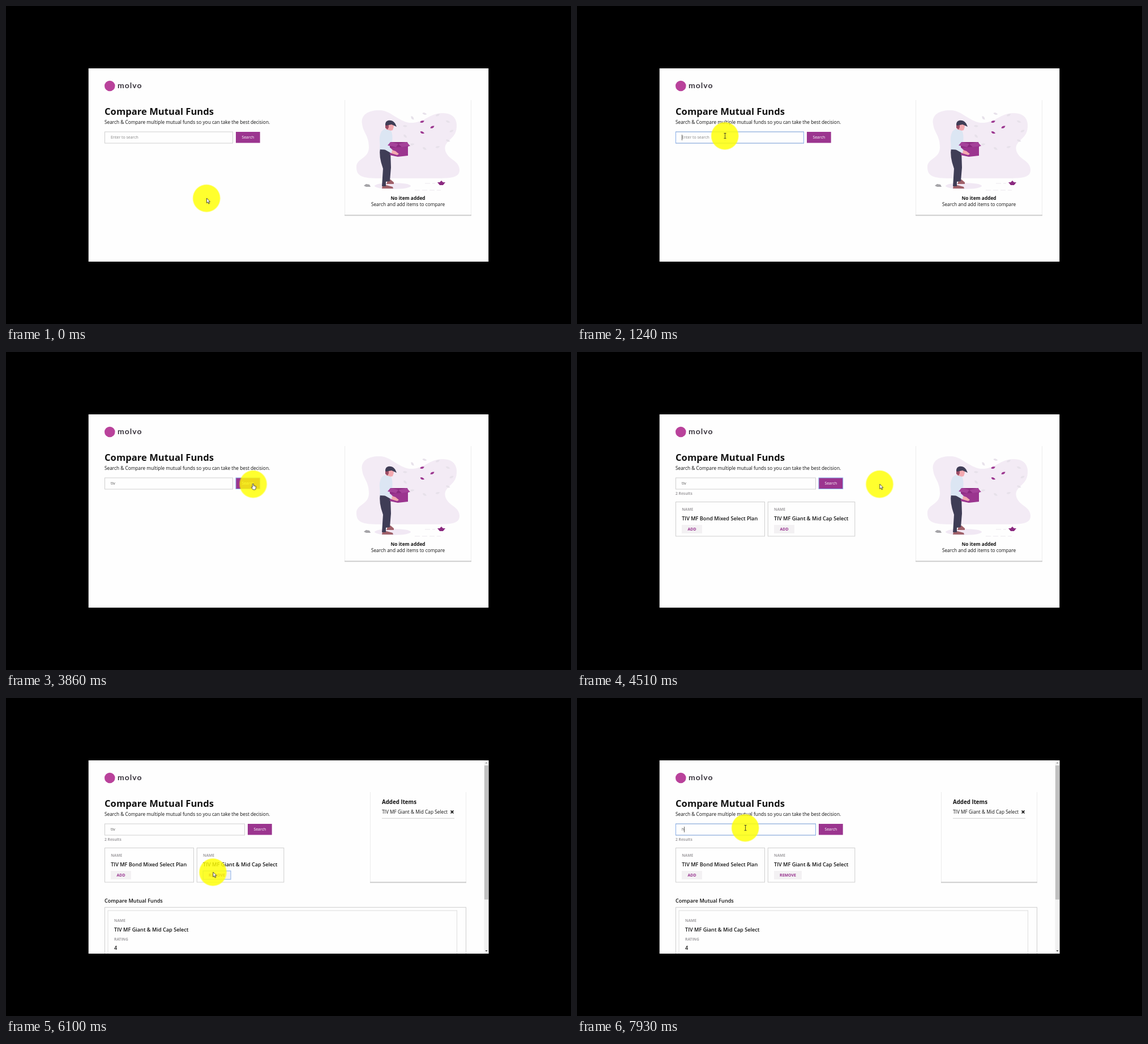
Recreate the animation shown at these times as an HTML page. Size 998 by 561 pixels, loop 8 s.

```html
<!DOCTYPE html>
<html lang="en">
<head>
<meta charset="utf-8">
<title>Fund comparison</title>
<style>
  html, body { margin: 0; width: 100%; height: 100%; overflow: hidden; background: #000; }
  svg { display: block; width: 100vw; height: 100vh; }
  text { font: 8.32px "Open Sans", sans-serif; fill: #111; }
  .h1 { font-size: 16.64px; font-weight: 700; }
  .h3 { font-size: 9.73px; font-weight: 700; }
  .title { font-size: 9.15px; font-weight: 600; }
  .bold { font-weight: 700; }
  .label { font-size: 6.66px; font-weight: 700; fill: #a2a0a3; }
  .field { font-size: 6.93px; fill: #555; }
  .hint { font-size: 6.93px; fill: #858585; }
  .action { font-size: 6.93px; font-weight: 700; fill: #97338f; text-anchor: middle; }
  .search { font-size: 6.93px; fill: #fff; text-anchor: middle; }
  .mid { text-anchor: middle; }
  .brand { font: 700 14px Lato, sans-serif; letter-spacing: 1px; fill: #39343d; }
  .box { fill: #fefefe; stroke: #cfcfcf; }
  .ring { fill: none; stroke: #86aeea; }
  .button { fill: #9b358f; }
  .soft { fill: #f3f1f3; }
  .caret { fill: #222; }
  .edge { fill: none; stroke: #ececec; }
  .under { stroke: #cdcdcd; stroke-width: 2; }
  .cursor { fill: #fff; stroke: #222; stroke-width: .8; }
</style>
</head>
<body>
<svg viewBox="0 0 998 561" preserveAspectRatio="none">
  <defs>
    <clipPath id="pageClip"><rect x="145.5" y="110" width="707" height="341"/></clipPath>
    <radialGradient id="glow">
      <stop offset=".93" stop-color="#ff0" stop-opacity=".82"/>
      <stop offset="1" stop-color="#ff0" stop-opacity=".25"/>
    </radialGradient>
    <path id="leaf" d="M-3.5 1.5Q-3-3 3.5-2.5Q2 3-3.5 1.5Z"/>
  </defs>

  <g clip-path="url(#pageClip)">
    <rect x="145.5" y="110" width="707" height="341" fill="#fefefe"/>
    <circle cx="183.3" cy="141" r="9.3" fill="#b9429b"/>
    <text class="brand" x="197" y="145">molvo</text>
    <text class="h1" x="174" y="192">Compare Mutual Funds</text>
    <text x="174" y="208">Search &amp; Compare multiple mutual funds so you can take the best decision.</text>

    <g id="bars"></g>
    <g id="results">
      <text class="label" x="174" y="252">2 Results</text>
      <g id="cards"></g>
    </g>

    <rect id="selection" x="185" y="227" width="8" height="10" fill="#a9c9f8"/>
    <text id="hint" class="hint" x="185" y="234.3">Enter to search</text>
    <g id="typing"></g>

    <g id="emptyPanel">
      <path class="edge" d="M598.5 166V369M821.5 166V369"/>
      <path class="under" d="M598 369.3H822"/>
      <path fill="#f3ebf5" d="M629 208C626 190 643 183 662 184S697 208 719 206S747 190 770 189S799 204 795 220S772 239 776 255S800 272 801 288S785 304 750 304H660C628 304 619 300 619 284S641 270 641 249S631 224 629 208Z"/>
      <ellipse cx="683" cy="317.5" rx="32" ry="5.5" fill="#f1e8f4"/>
      <path d="M740 313h18M722 325h46" stroke="#ebe8ed" stroke-dasharray="9 4"/>
      <path fill="#a5a4a8" d="M632 317l4-3 6 1 2 4h-8Z"/>
      <path fill="#8b2a80" d="M762 311h4l3-3 3 3h4l-4 5h-6Z"/>
      <g id="leaves"></g>
      <path fill="#a0616a" d="M674 308l5-2 6 5v3h-13ZM665 317l7-1 11 3 1 3h-20Z"/>
      <path fill="#3f3d56" d="M661 250L679 254L680 285L678 309L671 310V318H664L666 287Q658 265 661 250Z"/>
      <path fill="#f3a9b0" d="M671 207h13l1 6-2 6-4 1 1 5-8-1Z"/>
      <path fill="#9d4d65" d="M670 208h6v6l-2 4-4-3Z"/>
      <path fill="#3f3d56" d="M670 209C670 202 677 200 683 203Q687 205 690 213L681 209L671 211Z"/>
      <path fill="#dce6f3" d="M669 217L680 220Q685 228 680 254L660 253C662 243 658 237 661 227Q663 219 669 217Z"/>
      <path fill="#9b358f" d="M678 247h32v17l-18 2-14-3Z"/>
      <path fill="#8b2a80" d="M679 240h30l2 8-33 2Z"/>
      <path fill="#a5429a" d="M679 240l-5 6 15 3 4-6ZM708 240l6 7-15 2-6-6Z"/>
      <path fill="#dce6f3" d="M663 226C669 224 673 232 672 244L684 255L681 260L665 251Z"/>
      <path fill="#f3a9b0" d="M682 254l6 2 6 5-3 2-10-3Z"/>
      <text class="bold mid" x="710" y="341.5">No item added</text>
      <text class="mid" x="710" y="353">Search and add items to compare</text>
    </g>

    <g id="addedPanel">
      <path class="edge" d="M643.5 166V325M812.5 166V325"/>
      <path class="under" d="M643 325.3H813"/>
      <text class="h3" x="664" y="187.3">Added Items</text>
      <text x="664" y="204">TIV MF Giant &amp; Mid Cap Select</text>
      <path d="M785.6 198.7l4.8 4.8m0-4.8l-4.8 4.8" stroke="#111" stroke-width="1.7"/>
      <path d="M664 212.3H792" stroke="#cfcfcf"/>
    </g>

    <text id="compareTitle" class="title" x="174" y="360.5">Compare Mutual Funds</text>
    <rect id="compareEmpty" class="box" x="174.5" y="369.3" width="647" height="10.5"/>
    <g id="compare">
      <rect class="box" x="174.5" y="369.3" width="638" height="120"/>
      <rect class="box" x="180" y="375" width="616.5" height="110" style="stroke:#dedede"/>
      <text class="label" x="191" y="395.3">NAME</text>
      <text class="title" x="191" y="412">TIV MF Giant &amp; Mid Cap Select</text>
      <text class="label" x="191" y="427.5">RATING</text>
      <text class="title" x="191" y="444.3">4</text>
      <rect x="844.5" y="110" width="8" height="341" fill="#f1f1f1"/>
      <rect x="845" y="119" width="7" height="236.5" fill="#c1c1c1"/>
      <path d="M846.5 115.5l2-2.5 2 2.5Z" fill="#999"/>
      <path d="M846.5 445l2 2.5 2-2.5Z" fill="#444"/>
    </g>
  </g>

  <g id="pointer">
    <circle cx=".2" cy=".2" r="24.7" fill="url(#glow)"/>
    <path id="arrow" class="cursor" d="M.5 0v8.6l2-1.8 1.4 3.2 1.4-.6-1.4-3.1h2.6Z"/>
    <path id="beam" class="cursor" d="M-1.5-4.5h4M.5-4.5v9M-1.5 4.5h4"/>
    <path id="hand" class="cursor" d="M-1 5V0q1-1.4 2 0v3l4 1v3l-1 3H0L-3 6q0-1.6 2-.3Z"/>
  </g>
</svg>
<script>
const LOOP = 8000;
const FOCUS = 1240, SUBMIT = 3720, RESULTS = 4370, ADDED = 5650, LOADED = 5960;
const REFOCUS = 7000, SELECTED = 7170, RETYPE = 7930;
const timing = { duration: LOOP, iterations: Infinity };
const byId = id => document.getElementById(id);
const append = (id, markup) => byId(id).insertAdjacentHTML('beforeend', markup);

// Visible only between the two times, with hard changes.
function show(id, from, to = LOOP) {
  const frame = (time, opacity) => ({ offset: time / LOOP, opacity, easing: 'steps(1, end)' });
  const frames = [frame(from, 1), frame(LOOP, 0)];
  if (from > 0) frames.unshift(frame(0, 0));
  if (to < LOOP) frames.splice(-1, 0, frame(to, 0));
  byId(id).animate(frames, timing);
}

function addSearchBar(id, width) {
  const input = `x="174.5" y="222" width="${width}" height="20"`;
  const left = 180 + width;
  const button = `x="${left}" y="222" width="42.7" height="19.5"`;
  append('bars', `<g id="${id}">
    <rect class="box" ${input}/><rect class="button" ${button}/>
    <text class="search" x="${left + 21.3}" y="234.3">Search</text>
    <rect id="${id}Focus" class="ring" ${input}/>
    <rect id="${id}Press" class="ring" ${button}/></g>`);
}

function addButton(parent, id, x, width, label) {
  const area = `x="${x}" y="305" width="${width}" height="15"`;
  append(parent, `<g id="${id}"><rect class="soft" ${area}/>
    <text class="action" x="${x + width / 2}" y="315">${label}</text>
    <rect id="${id}Focus" class="ring" ${area} opacity="0"/></g>`);
}

function addCard(x, width, name) {
  append('cards', `<rect class="box" x="${x}" y="264.5" width="${width}" height="60.5"/>
    <text class="label" x="${x + 10.7}" y="280">NAME</text>
    <text class="title" x="${x + 10.7}" y="297">${name}</text>`);
}

// A typed text with the caret right behind it.
function addTyped(id, text, from, to, caretTo) {
  append('typing', `<text id="${id}" class="field" x="185" y="234.3">${text}</text>`);
  const end = 185 + byId(id).getComputedTextLength();
  append('typing', `<rect id="${id}Caret" class="caret" x="${end}" y="227" width=".7" height="10"/>`);
  show(id, from, to);
  show(id + 'Caret', from, caretTo);
}

function addLeafRing(count, color, cx, cy, rx, ry) {
  for (let i = 0; i < count; i++) {
    const angle = i * 2 * Math.PI / count;
    const x = cx + rx * Math.cos(angle), y = cy + ry * Math.sin(angle);
    append('leaves', `<use href="#leaf" fill="${color}" transform="translate(${x} ${y}) rotate(${i * 50 % 90})"/>`);
  }
}

// Each leg eases from the previous place to (x, y); between legs the pointer rests.
function travel(id, x, y, legs) {
  const frames = [];
  const mark = (time, easing) =>
    frames.push({ offset: time / LOOP, transform: `translate(${x}px, ${y}px)`, easing });
  mark(0, 'linear');
  for (const leg of legs) {
    mark(leg.from, leg.ease || 'ease-in-out');
    ({ x, y } = leg);
    mark(leg.to, 'linear');
  }
  mark(LOOP, 'linear');
  byId(id).animate(frames, timing);
}

addSearchBar('narrow', 226);
addSearchBar('wide', 247);
addCard(174.5, 157, 'TIV MF Bond Mixed Select Plan');
addCard(337.3, 153.5, 'TIV MF Giant &amp; Mid Cap Select');
addButton('cards', 'addFirst', 185, 36, 'ADD');
addButton('cards', 'addSecond', 348, 36, 'ADD');
addButton('results', 'remove', 348, 49, 'REMOVE');
addLeafRing(11, '#e7e1ea', 745, 221, 42, 31);
addLeafRing(3, '#9b358f', 741, 214, 12, 11);

show('narrow', 0, RESULTS);
show('narrowFocus', FOCUS, SUBMIT);
show('narrowPress', SUBMIT, RESULTS);
show('wide', RESULTS);
show('results', RESULTS);
show('widePress', RESULTS, ADDED);
show('wideFocus', REFOCUS);
show('addSecond', 0, ADDED);
show('remove', ADDED);
show('removeFocus', ADDED, REFOCUS);

show('emptyPanel', 0, ADDED);
show('addedPanel', ADDED);
show('compareTitle', ADDED);
show('compareEmpty', ADDED, LOADED);
show('compare', LOADED);
// The scrollbar pushes the panel to the left.
byId('addedPanel').animate([
  { offset: 0, transform: 'translateX(9px)', easing: 'steps(1, end)' },
  { offset: LOADED / LOOP, transform: 'translateX(0)' },
  { offset: 1, transform: 'translateX(0)' }
], timing);

addTyped('blank', '', FOCUS, 1750, 1750);
addTyped('first', 't', 1960, 2130, 2130);
addTyped('second', 'ti', 2130, 2370, 2370);
addTyped('query', 'tiv', 2370, RETYPE, 2820);
addTyped('next', 'h', RETYPE, LOOP, LOOP);
show('hint', 0, 1960);
show('selection', SELECTED, RETYPE);

// The cursor takes the shape that belongs to what lies below it.
const cursors = [
  ['arrow', 0], ['beam', 980], ['hand', 3200], ['arrow', 3880],
  ['hand', 5340], ['arrow', 6010], ['beam', 6620]
];
for (const shape of ['arrow', 'beam', 'hand']) {
  const frames = cursors.map(([name, from]) =>
    ({ offset: from / LOOP, opacity: +(name === shape), easing: 'steps(1, end)' }));
  byId(shape).animate([...frames, { offset: 1, opacity: 0 }], timing);
}

travel('pointer', 354, 339, [
  { from: 290, to: 440, x: 341, y: 291 },
  { from: 630, to: 1100, x: 261, y: 229 },
  { from: 2790, to: 3000, x: 387, y: 204, ease: 'ease-in' },
  { from: 3000, to: 3510, x: 434, y: 233, ease: 'ease-out' },
  { from: 3830, to: 4130, x: 548, y: 227 },
  { from: 4350, to: 5180, x: 369, y: 304 },
  { from: 5310, to: 5410, x: 368, y: 311 },
  { from: 5970, to: 6680, x: 317, y: 237, ease: 'ease-in' },
  { from: 6680, to: 6820, x: 297, y: 229, ease: 'ease-out' }
]);
</script>
</body>
</html>
```
